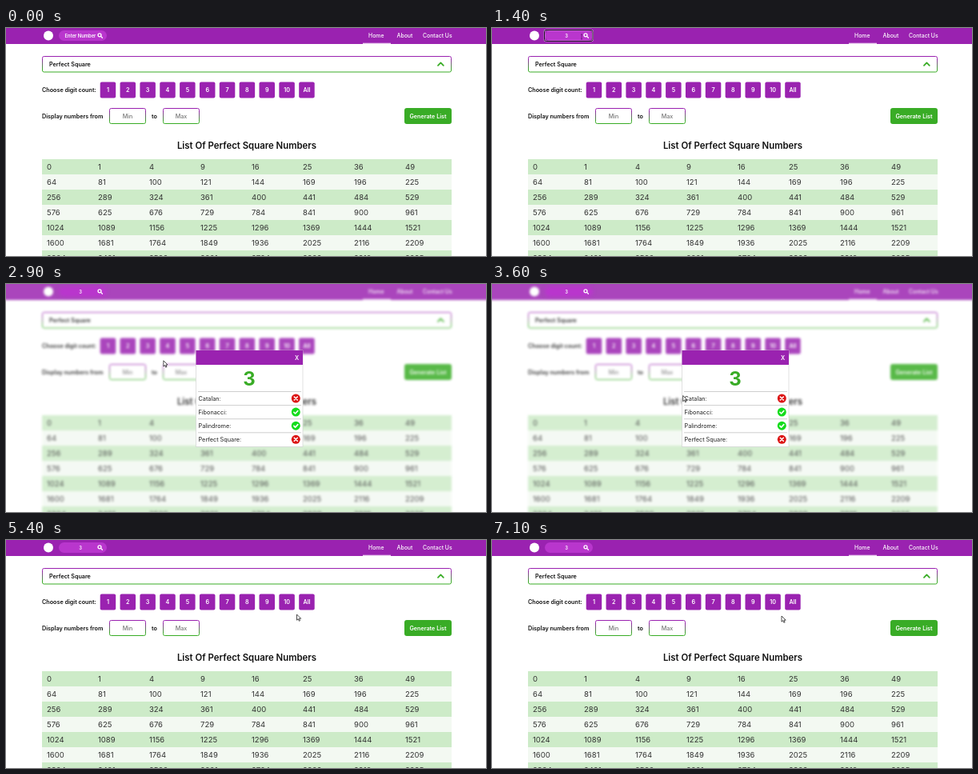
An HTML page for the animation above (7300 ms loop, 600x285 px).

```html
<!DOCTYPE html>
<html lang="en">
<head>
<meta charset="utf-8">
<title>Number lists</title>
<style>
  html, body { margin: 0; width: 100%; height: 100%; overflow: hidden; background: #fff; }
  svg { display: block; width: 100%; height: 100%; }
  text { font: 600 7.2px Inter, sans-serif; fill: #111; }
  .white { fill: #fff; }
  .middle { text-anchor: middle; }
  .nav { font-size: 6.9px; font-weight: 500; fill: #fff; }
  .cell { font-size: 9.5px; font-weight: 400; fill: #333; }
  .title { font-size: 11.4px; }
  .hint { font-weight: 500; fill: #777; }
  .search { font-size: 5.8px; fill: #fff; }
  .label { font-size: 7.3px; font-weight: 400; fill: #222; }
  .big { font-size: 24px; font-weight: 700; fill: #39ac26; }
  .box { fill: #fff; stroke: url(#edge); }
  .line { fill: none; stroke-linecap: round; stroke-linejoin: round; }
</style>
</head>
<body>
<svg viewBox="0 0 600 285">
  <defs>
    <linearGradient id="edge" x2="0" y2="1">
      <stop offset=".15" stop-color="#9a22b0"/>
      <stop offset=".85" stop-color="#39ac26"/>
    </linearGradient>
  </defs>

  <g id="page">
    <rect x="-20" y="-20" width="640" height="40" fill="#9a22b0"/>
    <circle cx="53" cy="9.5" r="6" class="white"/>
    <text x="453" y="12" class="nav">Home</text>
    <text x="488.5" y="12" class="nav">About</text>
    <text x="521" y="12" class="nav">Contact Us</text>
    <rect x="446" y="18.7" width="35" height="1.3" fill="#ecd0f1"/>

    <rect x="45.5" y="35.5" width="511" height="19.5" rx="2" class="box"/>
    <text x="54" y="47.6">Perfect Square</text>
    <path d="M540 46.8l3.4-3.4 3.4 3.4" class="line" stroke="#39ac26" stroke-width="1.8"/>

    <text x="45" y="80">Choose digit count:</text>
    <g id="digits"></g>

    <text x="45" y="112.5">Display numbers from</text>
    <rect x="129.5" y="100.5" width="45" height="19" rx="2" class="box"/>
    <text x="152" y="112.7" class="hint middle">Min</text>
    <text x="182" y="112.5">to</text>
    <rect x="196.5" y="100.5" width="45" height="19" rx="2" class="box"/>
    <text x="219" y="112.7" class="hint middle">Max</text>
    <rect x="498" y="100" width="59" height="20" rx="3" fill="#39ac26"/>
    <text x="527.5" y="112.6" class="white middle">Generate List</text>

    <text x="301" y="150.6" class="title middle">List Of Perfect Square Numbers</text>
    <g id="table"></g>
  </g>

  <rect id="pill" x="66" y="3" width="60" height="13" rx="6.5" fill="#b936cd"/>
  <g id="focus" class="line">
    <rect x="65.5" y="2.5" width="60.5" height="14" rx="2" stroke="#e6c5ec" stroke-width="1.6"/>
    <rect x="65.5" y="2.5" width="60.5" height="14" rx="2" stroke="#24102a"/>
  </g>
  <text id="entry" x="93" y="11.6" class="search middle"></text>
  <g id="lens" class="line" stroke-width="1.3">
    <circle cx="117" cy="8.8" r="2"/>
    <path d="M118.6 10.4l1.8 1.8"/>
  </g>

  <g id="modal">
    <rect x="237.5" y="83" width="133.5" height="120.5" fill="#fff" stroke="#ccc" stroke-width=".6"/>
    <rect x="237.5" y="83" width="133.5" height="18" fill="#9a22b0"/>
    <text id="close" x="363.5" y="95" class="middle">X</text>
    <text x="304" y="126.5" class="big middle">3</text>
    <g id="results"></g>
  </g>

  <g id="cursor" stroke-linejoin="round">
    <path id="arrow" d="M0 0v7.2l1.7-1.5 1.2 2.6 1.2-.6-1.2-2.5h2.3z" fill="#fff" stroke="#222" stroke-width=".8"/>
    <path id="hand" d="M-.9.8q.9-1.4 1.7 0v2.8l3.3.7q1 .3.9 1.5l-.8 3.2h-4.4l-2.6-3.3q.2-1.3 1.9-.2z" fill="#fff" stroke="#222" stroke-width=".8"/>
    <path id="beam" d="M-1 0h2M0 0v6M-1 6h2" fill="none" stroke="#4b1656" stroke-width=".6"/>
  </g>
</svg>

<script>
const LOOP = 7300, STEP = 100;
const $ = id => document.getElementById(id);
const show = (id, on) => $(id).style.display = on ? '' : 'none';
const ramp = (t, from, to) => Math.min(1, Math.max(0, (t - from) / (to - from)));
const repeat = (count, make) => Array.from({ length: count }, (_, i) => make(i)).join('');

$('digits').innerHTML = repeat(11, i => {
  const x = 117.7 + i * 24.85;
  return `<rect x="${x}" y="67.5" width="19.5" height="20" rx="2" fill="#9a22b0"/>
    <text x="${x + 9.75}" y="80.2" class="white middle">${i < 10 ? i + 1 : 'All'}</text>`;
});

$('table').innerHTML = repeat(7, row => {
  const y = 164 + row * 19;
  return `<rect x="45" y="${y}" width="512" height="19" fill="${row % 2 ? '#f3f9f2' : '#cdebc8'}"/>` +
    repeat(8, col => `<text x="${51 + col * 64}" y="${y + 13}" class="cell">${(row * 8 + col) ** 2}</text>`);
});

const results = [['Catalan', false], ['Fibonacci', true], ['Palindrome', true], ['Perfect Square', false]];
$('results').innerHTML = results.map(([name, match], i) => {
  const y = 143 + i * 17.1;
  const mark = match ? 'M-2.4 .2l1.7 1.7 3.2-3.5' : 'M-2-2l4 4M2-2l-4 4';
  return `<path d="M240 ${y - 8.5}h129" stroke="#bbb" stroke-width=".7"/>
    <text x="240.5" y="${y + 2.6}" class="label">${name}:</text>
    <g transform="translate(362.3 ${y})">
      <circle r="5.5" fill="${match ? '#13dc1c' : '#dc1414'}"/>
      <path d="${mark}" class="line" stroke="#fff" stroke-width="1.6"/>
    </g>`;
}).join('');

// Pointer stops: time, x, y
const stops = [
  [100, 580, 262], [800, 96, 7], [1200, 96, 7], [1400, 112, 8], [1600, 121, 9],
  [2400, 121, 9], [3200, 232, 136], [3600, 238.7, 139.5], [4100, 243, 190],
  [4800, 365, 93], [5200, 365, 93], [5400, 363.5, 93], [6000, 363.5, 93],
  [6300, 362, 95], [LOOP, 362, 95]
];

function pointerAt(t) {
  const next = Math.max(1, stops.findIndex(stop => stop[0] > t));
  const [t0, x0, y0] = stops[next - 1], [t1, x1, y1] = stops[next];
  const u = ramp(t, t0, t1), eased = u * u * (3 - 2 * u);
  return [x0 + (x1 - x0) * eased, y0 + (y1 - y0) * eased];
}

function draw(t) {
  const open = t < 5300 ? ramp(t, 1700, 2000) : 0;
  $('page').style.filter = open ? `blur(${1.6 * open}px)` : '';
  $('page').style.opacity = 1 - 0.16 * open;
  $('pill').style.filter = open ? `blur(${2.2 * open}px)` : '';
  $('modal').style.opacity = open;
  show('modal', open > 0);

  show('focus', t >= 800 && t < 1700);
  $('entry').textContent = t < 1200 ? 'Enter Number' : '3';
  $('lens').style.stroke = t >= 1600 && t < 2500 ? '#39ac26' : '#fff';
  $('close').style.fill = t >= 4700 ? '#ff8a1f' : '#fff';

  const beam = t >= 800 && t < 1500;
  const hand = (t >= 1500 && t < 2500) || (t >= 4700 && t < 5300);
  show('cursor', t >= 100);
  show('beam', beam);
  show('hand', hand);
  show('arrow', !beam && !hand);
  $('cursor').setAttribute('transform', `translate(${pointerAt(t)})`);
}

const start = performance.now();
function tick() {
  const t = (performance.now() - start) % LOOP;
  draw(Math.floor(t / STEP) * STEP);
  requestAnimationFrame(tick);
}
tick();
</script>
</body>
</html>
```
